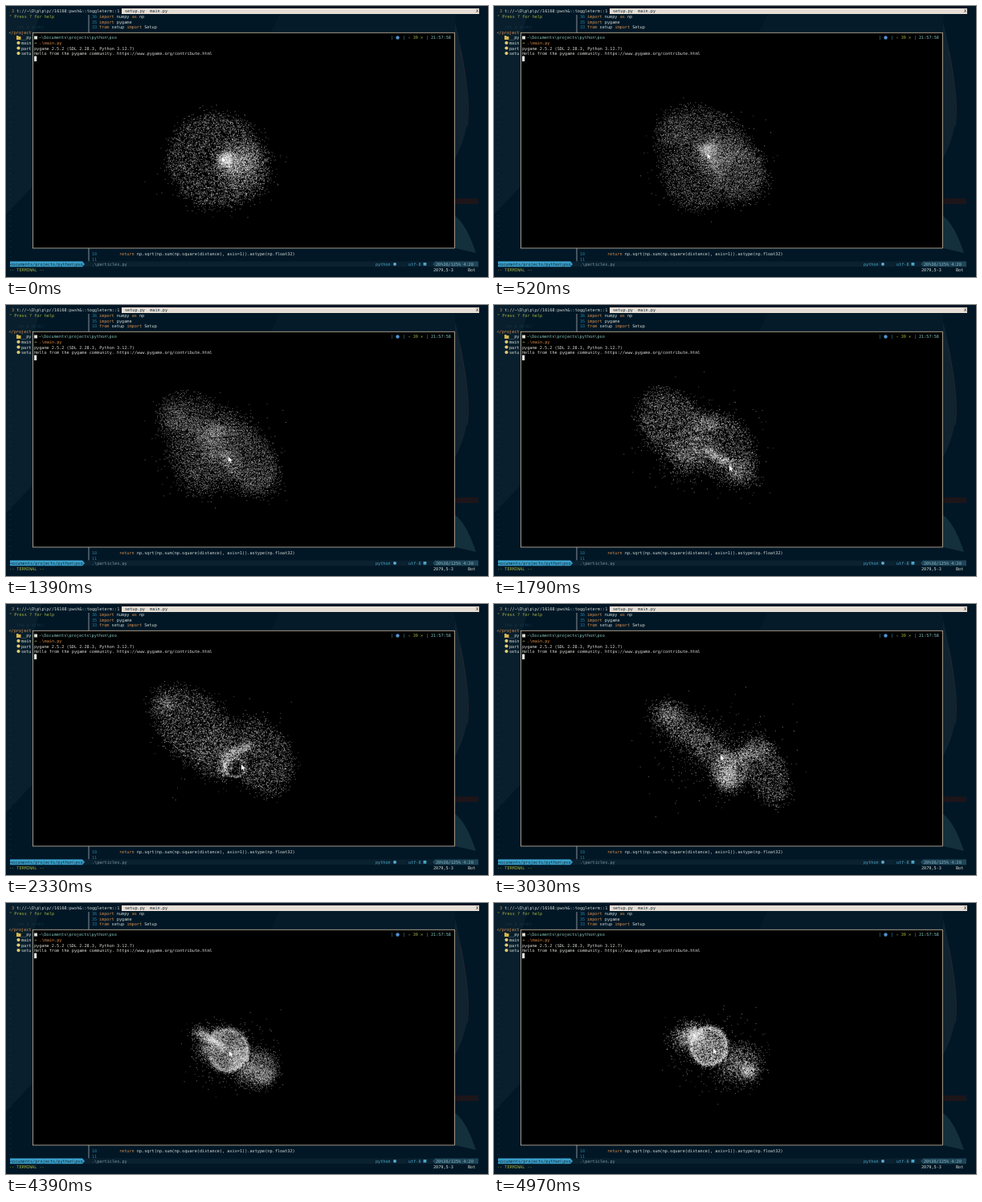
An HTML page with a canvas that plays this animation: 600 px wide and 338 px high, repeating every 5 s.

```html
<!DOCTYPE html>
<html lang="en">
<head>
<meta charset="utf-8">
<title>Particle swarm in a terminal</title>
<style>
html, body { margin: 0; width: 100%; height: 100%; overflow: hidden; background: #011726; }
svg, canvas { position: absolute; left: 0; top: 0; width: 600px; height: 338px; }
text { font: 5.2px "DejaVu Sans Mono", "Noto Sans Mono", monospace; fill: #d8dcd6; white-space: pre; }
.lime { fill: #a9b443; } .teal { fill: #2f7d9c; } .gold { fill: #dc8f4c; }
.dark { fill: #10222e; } .dim { fill: #17364a; } .cyan { fill: #4aa3c6; } .path { fill: #83c5c0; }
</style>
</head>
<body>
<svg viewBox="0 0 600 338">
  <rect width="600" height="338" fill="#011726"/>
  <path d="M0 0H45L33 40V225L0 260Z" fill="#091f2d"/>
  <path d="M340 11H559V33H330Z" fill="#061b29"/>
  <path d="M559 20Q574 80 575 130Q575 160 559 190Z" fill="#10232f"/>
  <path d="M566 55Q579 120 574 150" fill="none" stroke="#26262f"/>
  <path d="M559 302V262Q573 272 585 308Z" fill="#14303d"/>
  <rect x="559" y="240" width="29" height="7" fill="#1d1519"/>
  <rect x="144" y="3" width="445" height="7" fill="#e6ded5"/>
  <text x="7" y="8.4"><tspan class="gold">3</tspan> t://~\D\p\p\p//16168:pwsh&amp;::toggleterm::1</text>
  <text x="148" y="8.4" class="dark">setup.py  main.py</text>
  <text x="585" y="8.4" class="dark">X</text>

  <text x="4" y="15" class="lime">" Press ? for help</text>
  <text x="13" y="28" class="dim">(on a disk)</text>
  <text x="3.5" y="34.8" class="gold">&lt;/project</text>
  <text x="19" y="41.4">__py</text>
  <path d="M13 37h2l1 1h2.500v4H13z" fill="#d8b54c"/>
  <g fill="#e3cd72">
    <circle cx="15.500" cy="46" r="2.100"/><circle cx="15.500" cy="52.500" r="2.100"/><circle cx="15.500" cy="59" r="2.100"/>
  </g>
  <text x="19" y="48">main</text><text x="19" y="54.500">part</text><text x="19" y="61">setu</text>
  <g id="tildes"></g>

  <path d="M103 11V33M103 302V318.500" stroke="#aab3b4" stroke-width=".8"/>
  <text x="107" y="15" class="teal">36</text>
  <text x="107" y="21.500" class="teal">35</text>
  <text x="107" y="28" class="teal">33</text>
  <text x="116" y="15"><tspan class="gold">import</tspan> numpy <tspan class="gold">as</tspan> np</text>
  <text x="116" y="21.500"><tspan class="gold">import</tspan> pygame</text>
  <text x="116" y="28"><tspan class="gold">from</tspan> setup <tspan class="gold">import</tspan> Setup</text>

  <rect x="33.500" y="33.300" width="525" height="268.700" fill="#000" stroke="#c9b9a2" stroke-width=".8"/>
  <rect x="35" y="37.500" width="4" height="4" fill="#d8dcd6"/>
  <text x="41" y="41.400" class="path">~\Documents\projects\python\pso</text>
  <text x="35" y="48" class="lime">➜</text><text x="41.300" y="48" class="gold">.\main.py</text>
  <text x="35" y="54.500">pygame 2.5.2 (SDL 2.28.3, Python 3.12.7)</text>
  <text x="35" y="61">Hello from the pygame community. https://www.pygame.org/contribute.html</text>
  <rect x="35" y="62.500" width="3.200" height="6.500" fill="#e8e8e8"/>
  <text x="479" y="41.400" class="cyan">|</text><circle cx="487.500" cy="39.500" r="2.200" fill="#4f91cf"/>
  <text x="494" y="41.400" class="cyan">|</text>
  <text x="500.500" y="41.400" class="lime">✧ 39 ✕</text>
  <text x="523" y="41.400" class="cyan">|</text>
  <text x="529" y="41.400" class="path">21:57:58</text>

  <text x="107" y="311" class="teal">10</text>
  <text x="141" y="311"><tspan class="gold">return</tspan> np.sqrt(np.sum(np.square(distance), axis=1)).astype(np.float32)</text>
  <text x="107" y="317.500" class="teal">11</text>
  <rect x="5" y="318.500" width="583" height="6.800" fill="#0a2130"/>
  <path d="M5 318.500H95l3 3.400l-3 3.400H5z" fill="#3aa0cb"/>
  <text x="5" y="323.700" class="dark">&lt;ocuments/projects/python\pso</text>
  <text x="107" y="323.700" style="fill:#7f98a3">.\particles.py</text>
  <text x="460" y="323.700" class="cyan">python</text><circle cx="484" cy="321.900" r="2" fill="#5aa9cf"/>
  <text x="501" y="323.700" class="cyan">utf-8</text><rect x="519.500" y="320" width="3.800" height="3.800" fill="#4aa3c6"/>
  <path d="M588 318.500H534l-3 3.400l3 3.400h54z" fill="#1f4557"/>
  <text x="535" y="323.700" style="fill:#8cb4c2">20%36/125% 4:20</text>
  <text x="4" y="331.200" class="lime">-- TERMINAL --</text>
  <text x="532" y="331.200">2079,5-3</text><text x="575" y="331.200">Bot</text>
</svg>
<canvas id="stage" width="600" height="338"></canvas>
<script>
const COUNT = 8192, LOOP = 5000;
const ctx = document.getElementById('stage').getContext('2d');

let tildes = '';
for (let y = 74; y < 318; y += 6.5) tildes += `<text x="4" y="${y}" class="dim">~</text>`;
document.getElementById('tildes').innerHTML = tildes;

let seed = 20;
function rand() {
  seed = (seed * 1664525 + 1013904223) % 4294967296;
  return seed / 4294967296;
}
const gauss = () => (rand() + rand() + rand() + rand() - 2) * 1.7;

// Each part has a share of the particles and a way to place one of them.
function oval(share, x, y, rx, ry, deg, power, blur) {
  const c = Math.cos(deg * Math.PI / 180), s = Math.sin(deg * Math.PI / 180);
  return { share, place() {
    const a = rand() * 2 * Math.PI, r = rand() ** power * (1 + blur * gauss());
    const u = r * rx * Math.cos(a), v = r * ry * Math.sin(a);
    return [x + u * c - v * s, y + u * s + v * c];
  } };
}
const disc = (share, x, y, rx, ry, deg = 0) => oval(share, x, y, rx, ry, deg, .5, .14);
const ring = (share, x, y, rx, ry, deg = 0) => oval(share, x, y, rx, ry, deg, .07, .05);
const soft = (share, x, y, rx, ry) =>
  ({ share, place: () => [x + gauss() * rx * .6, y + gauss() * ry * .6] });
const streak = (share, x1, y1, x2, y2, width) => ({ share, place() {
  const p = rand();
  return [x1 + (x2 - x1) * p + gauss() * width, y1 + (y2 - y1) * p + gauss() * width];
} });

// Halving by x and y in turn gives neighbours the same index in every pose.
function arrange(points, axis = 0) {
  if (points.length < 2) return points;
  points.sort((a, b) => a[axis] - b[axis]);
  const half = points.length / 2;
  return [...arrange(points.slice(0, half), 1 - axis), ...arrange(points.slice(half), 1 - axis)];
}

function scatter(parts) {
  const total = parts.reduce((sum, p) => sum + p.share, 0), points = [];
  for (let i = 0; i < COUNT; i++) {
    let pick = rand() * total, k = 0;
    while (k < parts.length - 1 && pick > parts[k].share) pick -= parts[k++].share;
    points.push(parts[k].place());
  }
  return arrange(points);
}

const pose = (time, mouse, ...parts) => ({ time, mouse, points: scatter(parts) });
const poses = [
  pose(0, [269, 188],
    disc(50, 261, 192, 57, 56), ring(7, 258, 192, 55, 56), disc(14, 298, 204, 32, 35),
    soft(18, 288, 194, 22, 19), soft(9, 273, 191, 9, 9), soft(2, 265, 195, 60, 50)),
  pose(1030, [262, 179],
    disc(25, 257, 160, 58, 40, 28), disc(31, 302, 201, 55, 38, 42), ring(4, 310, 207, 36, 30, 25),
    disc(19, 248, 212, 36, 44), streak(10, 207, 135, 255, 166, 7),
    soft(8, 261, 166, 15, 12), soft(3, 270, 190, 65, 55)),
  pose(1790, [293, 200],
    disc(37, 224, 151, 50, 37, 45), disc(27, 283, 176, 47, 35, 48), streak(8, 262, 180, 292, 197, 4),
    soft(4, 270, 147, 16, 8), soft(9, 240, 190, 22, 20), soft(8, 306, 207, 20, 18),
    soft(4, 258, 168, 62, 48)),
  pose(2330, [293, 200],
    disc(36, 234, 153, 57, 39, 43), soft(4, 197, 123, 15, 14), disc(30, 317, 190, 49, 36, 65),
    disc(8, 255, 187, 25, 30), streak(7, 305, 175, 276, 188, 4), streak(8, 276, 187, 270, 213, 5),
    ring(3, 285, 204, 14, 12), soft(2, 268, 172, 62, 48)),
  pose(3030, [282, 188],
    streak(26, 214, 139, 285, 192, 12), soft(6, 215, 136, 17, 13), disc(20, 293, 207, 24, 24),
    soft(11, 291, 213, 12, 18), streak(7, 300, 192, 336, 180, 6),
    disc(21, 337, 206, 46, 25, 65), soft(5, 278, 185, 64, 48)),
  pose(3790, [283, 188],
    disc(29, 285, 189, 29, 30), ring(13, 285, 189, 28, 30), streak(12, 241, 161, 286, 189, 2.5),
    soft(13, 301, 203, 10, 16), disc(22, 319, 212, 24, 23), soft(4, 290, 192, 45, 38)),
  pose(4970, [273, 181],
    disc(33, 267, 178, 23, 24), ring(13, 267, 178, 23, 24), soft(16, 243, 168, 19, 16),
    soft(7, 249, 163, 10, 9), soft(18, 304, 200, 24, 21), soft(6, 316, 209, 9, 8),
    soft(4, 272, 185, 44, 38))
];

function drawMouse(x, y) {
  ctx.globalAlpha = 1;
  ctx.fillStyle = '#fff';
  ctx.strokeStyle = '#222';
  ctx.lineWidth = .5;
  ctx.beginPath();
  for (const [dx, dy] of [[0, 0], [0, 7], [1.7, 5.5], [3, 8], [4, 7.5], [2.9, 5.1], [5, 5]])
    ctx.lineTo(x + dx, y + dy);
  ctx.closePath();
  ctx.stroke();
  ctx.fill();
}

function draw(now) {
  const t = now % LOOP;
  let k = 0;
  while (k < poses.length - 2 && t >= poses[k + 1].time) k++;
  const a = poses[k], b = poses[k + 1];
  const p = Math.min(1, (t - a.time) / (b.time - a.time));
  const mix = (from, to) => from + (to - from) * p;
  ctx.clearRect(0, 0, 600, 338);
  ctx.fillStyle = '#fff';
  for (let i = 0; i < COUNT; i++) {
    const from = a.points[i], to = b.points[i];
    ctx.globalAlpha = .2 + (i * 7919 % 100) / 330;
    ctx.fillRect(mix(from[0], to[0]), mix(from[1], to[1]), 1, 1);
  }
  drawMouse(mix(a.mouse[0], b.mouse[0]), mix(a.mouse[1], b.mouse[1]));
}

const start = performance.now();
function tick() {
  draw(performance.now() - start);
  requestAnimationFrame(tick);
}
tick();
</script>
</body>
</html>
```
